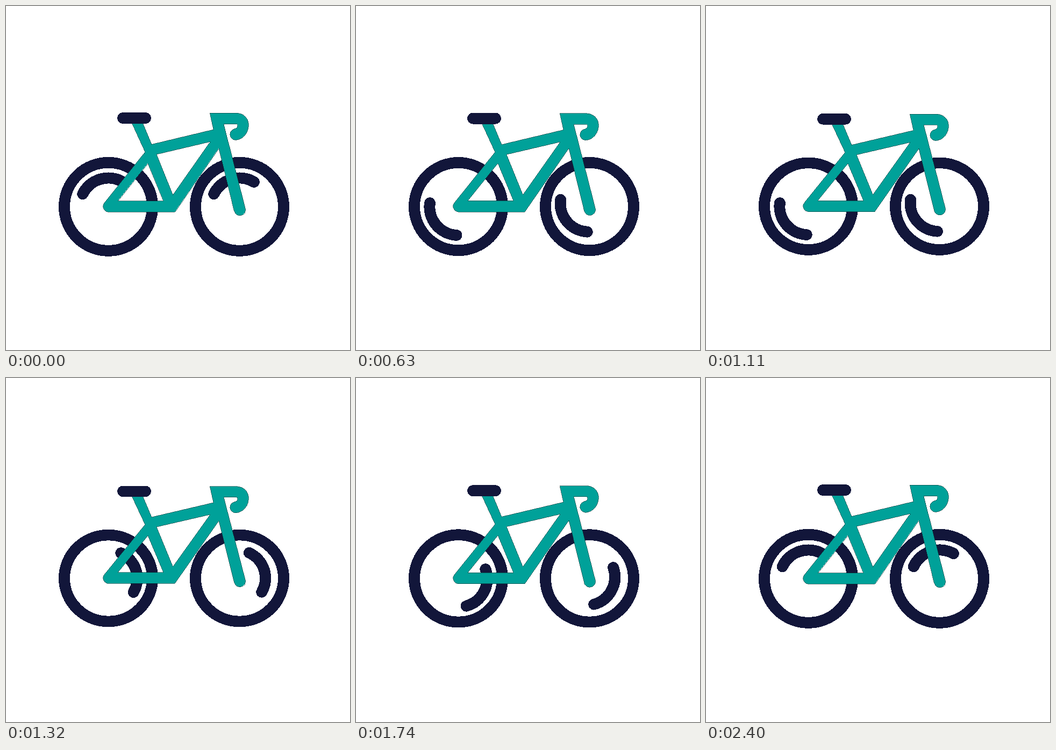
Recreate the animation shown at these times as an HTML page. Size 640 by 640 pixels, loop 2430 ms.

```html
<!DOCTYPE html>
<html lang="en">
<head>
<meta charset="utf-8">
<title>Bicycle</title>
<style>
  html, body { margin: 0; width: 100%; height: 100%; overflow: hidden; background: #fff; }
  svg { display: block; width: 100vw; height: 100vh; shape-rendering: crispEdges; }
  .navy { fill: none; stroke: #12163a; stroke-width: 21; stroke-linecap: round; }
  .frame { fill: #00a199; fill-rule: evenodd; stroke: #06302f; stroke-width: .6; }
</style>
</head>
<body>
<svg viewBox="0 0 640 640">
  <g id="bike">
    <g class="navy">
      <circle cx="190.5" cy="373.3" r="82"/>
      <circle cx="434.5" cy="373.3" r="82"/>
      <path id="rearGlint"/>
      <path id="frontGlint"/>
    </g>
    <path class="frame" d="
      M230.5 210 H251.2 L271 257.5 L386 230 L379.3 199.2 H428
      C442 199.2 451.3 209 451.3 221 C451.3 237 440 249.3 426.5 249.3
      A10.5 10.5 0 0 1 425 228.6 C429 228.3 431 225 431 222 Q431 219.5 428 219.5 H405
      L445.2 376.5 A10.5 10.5 0 0 1 424.8 382 L396 264.5 L314 383.4 H191
      A10.6 10.6 0 0 1 183.3 366 L258.8 271.5 Z
      M280 276 L380 252.5 L310.5 351.5 Z
      M264 292.5 L208 362.5 H293 Z"/>
    <path class="navy" d="M217.5 208.5 H259.5"/>
  </g>
</svg>
<script>
  const STEP = 30, LOOP = 2430, BOUNCE = 600;
  const TURN = -22.515;          // degrees per step
  const SQUASH = 0.0392, MID_Y = 332;
  const GLINT_R = 53.3, GLINT_FROM = 206.2, GLINT_TO = 300.3;

  const $ = id => document.getElementById(id);
  const bike = $("bike");
  // Each glint turns about a pivot slightly off its wheel centre.
  const glints = [
    { el: $("rearGlint"), x: 190.5, y: 373.3, px: 190.5, py: 373.6 },
    { el: $("frontGlint"), x: 434.5, y: 373.3, px: 432, py: 370.7 }
  ];

  const polar = (x, y, deg) => {
    const a = deg * Math.PI / 180;
    return `${x + GLINT_R * Math.cos(a)} ${y + GLINT_R * Math.sin(a)}`;
  };

  for (const { el, x, y } of glints) {
    el.setAttribute("d", `M${polar(x, y, GLINT_FROM)} A${GLINT_R} ${GLINT_R} 0 0 1 ${polar(x, y, GLINT_TO)}`);
  }

  function draw(now) {
    const step = Math.floor((now % LOOP) / STEP);
    const phase = (step * STEP % BOUNCE) / BOUNCE;
    const dip = 1 - Math.abs(1 - 2 * phase);
    const scale = 1 - SQUASH * (1 - Math.pow(1 - dip, 1.3));

    bike.setAttribute("transform", `translate(0 ${MID_Y * (1 - scale)}) scale(1 ${scale})`);
    for (const { el, px, py } of glints) {
      el.setAttribute("transform", `rotate(${step * TURN} ${px} ${py})`);
    }
  }

  const start = performance.now();
  function tick() {
    draw(performance.now() - start);
    requestAnimationFrame(tick);
  }
  tick();
</script>
</body>
</html>
```
